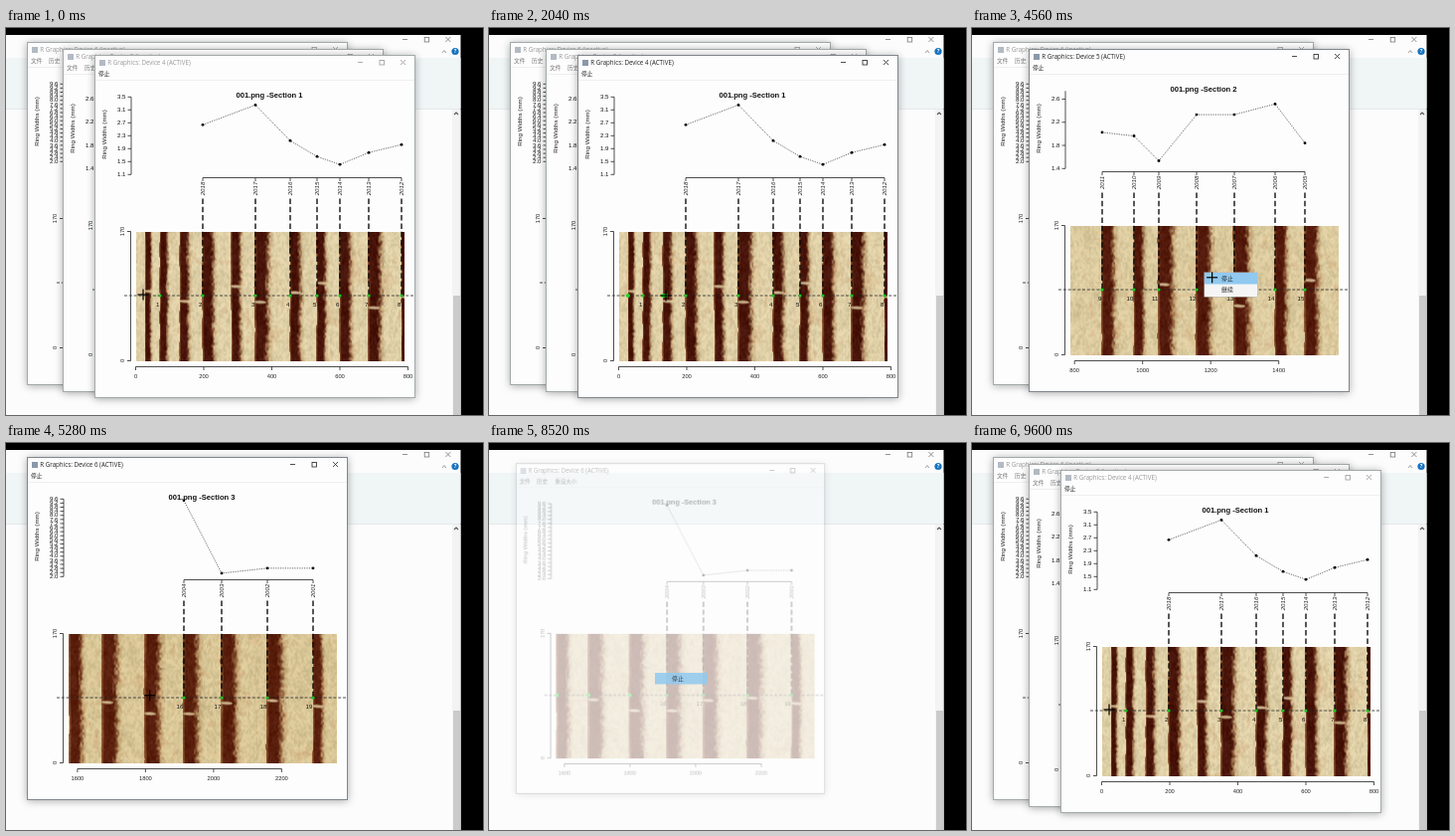
Animation, 480 px wide and 389 px high, one loop 9720 ms. Source, as an HTML page with a canvas:

```html
<!DOCTYPE html>
<html>
<head>
<meta charset="utf-8">
<style>
html, body { margin: 0; width: 480px; height: 389px; overflow: hidden; background: #000; }
canvas { display: block; }
</style>
</head>
<body>
<canvas id="stage" width="480" height="389"></canvas>
<script>
const W = 480, H = 389, LOOP = 9720, STEP = 120, CLOSE_MS = 300;
const PLOT = '"Liberation Sans", Arial, sans-serif';
const UI = '"Open Sans", "Noto Sans CJK SC", "Noto Sans CJK", sans-serif';
const WIN_W = 323, WIN_H = 345;
const SCAN = { x: 42, y: 177.5, w: 270, h: 130, mid: 242 };
const PX_PER_MM = 16.3;
const stage = document.getElementById('stage').getContext('2d');
const layer = newCanvas(W, H);
let c = stage;

function newCanvas(w, h) {
  const el = document.createElement('canvas');
  el.width = w;
  el.height = h;
  return el.getContext('2d');
}

// ---------- drawing helpers ----------
function rect(x, y, w, h, color) {
  c.fillStyle = color;
  c.fillRect(x, y, w, h);
}

function line(points, color = '#222', width = 0.8, dash = []) {
  c.beginPath();
  points.forEach(([x, y]) => c.lineTo(x, y));
  c.setLineDash(dash);
  c.strokeStyle = color;
  c.lineWidth = width;
  c.stroke();
  c.setLineDash([]);
}

function dot(x, y, r, color) {
  c.fillStyle = color;
  c.beginPath();
  c.arc(x, y, r, 0, 7);
  c.fill();
}

function text(str, x, y, font, color = '#222', align = 'center', turn = 0) {
  c.save();
  c.translate(x, y);
  c.rotate(turn);
  c.font = font;
  c.fillStyle = color;
  c.textAlign = align;
  c.textBaseline = 'middle';
  c.fillText(str, 0, 0);
  c.restore();
}

const upText = (str, x, y, font) => text(str, x, y, font + PLOT, '#222', 'center', -Math.PI / 2);

function caption(x, y, gap, color) {
  line([[x - 2.5, y], [x + 2.5, y]], color);
  c.strokeRect(x + gap - 2, y - 2, 4.5, 4.5);
  const k = x + 2 * gap;
  line([[k - 2.5, y - 2.5], [k + 2.5, y + 2.5]], color);
  line([[k - 2.5, y + 2.5], [k + 2.5, y - 2.5]], color);
}

// ---------- wood texture ----------
function hash(x, y) {
  const s = Math.sin(x * 127.1 + y * 311.7) * 43758.5453;
  return s - Math.floor(s);
}

function noise(x, y) {
  const i = Math.floor(x), j = Math.floor(y), u = x - i, v = y - j;
  const top = hash(i, j) * (1 - u) + hash(i + 1, j) * u;
  const low = hash(i, j + 1) * (1 - u) + hash(i + 1, j + 1) * u;
  return top * (1 - v) + low * v;
}

const clamp = (v, lo, hi) => Math.max(lo, Math.min(hi, v));
const mix = (a, b, k) => a.map((v, i) => v + (b[i] - v) * k);

// Each ring border starts a dark band whose width follows the gap to the next one.
function wood(borders, seed, light, dark) {
  const g = newCanvas(SCAN.w, SCAN.h), img = g.createImageData(SCAN.w, SCAN.h);
  const rust = [146, 78, 28];
  const bands = borders.map((x, i) => {
    const next = borders[i + 1] ?? SCAN.w;
    return [x, clamp((next - x) * 0.38, 4, 15)];
  });
  for (let y = 0; y < SCAN.h; y++) for (let x = 0; x < SCAN.w; x++) {
    let deep = 0, warm = 0;
    for (const [bx, bw] of bands) {
      const u = (x - bx + 0.7 - noise(bx, y / 14) * 1.2) / bw;
      if (u < -0.1) continue;
      const edge = 0.68 + (noise(x / 2 + seed, y / 2.5) - 0.5) * 0.3;
      deep = Math.max(deep, clamp(u < edge ? u * 4 + 0.6 : 1 - (u - edge) * 2.6, 0, 1));
      warm = Math.max(warm, 0.85 - Math.max(0, u - edge) * 1.3);
    }
    const patch = noise(x / 7 + seed, y / 10), grain = noise(x / 1.6 + seed, y / 2.2);
    const stain = Math.max(0, patch - 0.62) + Math.max(0, grain - 0.8);
    const base = mix(light, rust, clamp(warm * 0.75 + stain * 0.6, 0, 1));
    const n = ((patch - 0.5) * 20 + (grain - 0.5) * 30) * (1 - deep * 0.4);
    const rgb = mix(base, dark, deep * 0.95).map(v => v + n);
    img.data.set([...rgb, 255], (y * SCAN.w + x) * 4);
  }
  g.putImageData(img, 0, 0);
  g.fillStyle = 'rgba(230,212,168,.8)';
  for (const [x] of bands) {
    if (hash(x, 3) < 0.45) continue;
    g.beginPath();
    g.ellipse(x + 5, 50 + hash(x, seed) * 34, 6, 1.5, 0.05, 0, 7);
    g.fill();
  }
  return g.canvas;
}

// ---------- the three plot windows ----------
// rings: border positions, the first one only opens the first ring
// clicks: [time, x]; menu: [time, x, y]
const devices = [
  {
    section: 3, x: 21, y: 14, from: 4800, close: 8280, low: 2, top: 9.6,
    rings: [4, 158, 196, 242, 288],
    clicks: [[5880, 43], [6480, 76], [6990, 119]], menu: [7800, 167, 231],
    light: [217, 199, 152], dark: [84, 25, 8]
  },
  {
    section: 2, x: 57, y: 21, from: 3600, close: 4640, low: 1.4, top: 2.74,
    rings: [41, 74, 106, 131, 169, 207, 248, 278],
    clicks: [], menu: [4300, 234, 246],
    light: [220, 204, 160], dark: [78, 20, 7]
  },
  {
    section: 1, x: 89, y: 27, from: 480, close: 3645, low: 1.1, top: 3.5,
    rings: [66, 109, 162, 197, 224, 247, 276, 309],
    clicks: [[480, 51], [1440, 86], [2040, 89], [2760, 138]], menu: [3120, 233, 252],
    light: [224, 209, 168], dark: [66, 13, 4]
  }
];

for (const d of devices) {
  d.year = 2025 - 7 * d.section;
  d.years = d.rings.slice(1);
  d.widths = d.years.map((x, i) => (x - d.rings[i]) / PX_PER_MM);
  d.marks = d.rings.filter(x => x > SCAN.x);
  d.chosen = d.close - 40;
  const borders = [...d.marks, ...d.clicks.map(k => k[1])].sort((a, b) => a - b);
  const apart = borders.filter((x, i) => !i || x - borders[i - 1] > 5);
  d.image = wood(apart.map(x => x - SCAN.x), d.section * 13, d.light, d.dark);
}

function frame(d, t) {
  const active = t >= d.from, ink = active ? '#222' : '#999';
  const busy = (active || d.section === 1) && t < d.close;
  const state = active || d.section === 1 ? 'ACTIVE' : 'inactive';
  c.save();
  c.shadowColor = 'rgba(0,0,0,.32)';
  c.shadowBlur = 8;
  c.shadowOffsetY = 1;
  rect(0, 0, WIN_W, WIN_H, '#fdfdfd');
  c.restore();
  c.lineWidth = 1;
  c.strokeStyle = active ? '#80868c' : '#a3a9a9';
  c.strokeRect(0.5, 0.5, WIN_W - 1, WIN_H - 1);
  rect(5, 5, 6, 6, active ? '#8b98aa' : '#b3bac4');
  text(`R Graphics: Device ${d.section === 2 ? 5 : 3 + d.section + (d.section === 1 ? 0 : 0)} (${state})`,
    13.3, 8, '6.2px ' + UI, ink, 'left');
  caption(267.5, 7.5, 21.5, ink);
  const items = busy ? [['停止', 4]] : [['文件', 4], ['历史', 22], ['重设大小', 41]];
  for (const [name, x] of items) text(name, x, 20, '5.7px ' + UI, active || busy ? '#222' : '#777', 'left');
  line([[1, 25.5], [WIN_W - 1, 25.5]], '#ececec');
}

function widthPlot(d) {
  const base = 120.3, axisX = 37, yearY = 123.5;
  const yOf = v => base - (v - d.low) * 78 / (d.top - d.low);
  const points = d.years.map((x, i) => [x, yOf(d.widths[i])]);
  text(`001.png -Section ${d.section}`, 176, 40.5, 'bold 7.6px ' + PLOT, '#111');
  upText('Ring Widths (mm)', 10.5, 80, '6.2px ');
  line([[axisX, yOf(d.top)], [axisX, base]]);
  for (let v = d.low; v < d.top + 0.1; v += 0.4) {
    line([[axisX - 3.5, yOf(v)], [axisX, yOf(v)]]);
    text(v.toFixed(1), axisX - 5.5, yOf(v), '6.1px ' + PLOT, '#111', 'right');
  }
  line(points, '#444', 0.8, [1.2, 1.2]);
  line([[d.years[0], yearY], [d.years.at(-1), yearY]]);
  points.forEach(([x, y], i) => {
    dot(x, y, 1.4, '#000');
    line([[x, yearY], [x, yearY + 3.5]]);
    upText(d.year - i, x, 134.5, 'italic 6.1px ');
  });
}

function scanPlot(d, t) {
  const { x: left, y: top, w, h, mid } = SCAN;
  c.drawImage(d.image, left, top, w, h);
  line([[36.5, top], [36.5, top + h]]);
  for (const [name, y] of [['170', top], ['0', top + h]]) {
    line([[33, y], [36.5, y]]);
    upText(name, 28, y, '5.8px ');
  }
  const start = 36.8 + 4.7 * d.section, gap = 68.5;
  let value = 800 * (d.section - 1), x = start;
  for (; x < 318; x += gap, value += 200) {
    line([[x, 313.5], [x, 317]]);
    text(value, x, 323.3, '5.8px ' + PLOT);
  }
  line([[start, 313.5], [x - gap, 313.5]]);
  line([[30, mid], [WIN_W - 1, mid]], '#222', 0.8, [3, 1.8]);
  for (const x of d.years) line([[x, 144.5], [x, mid]], '#000', 1.3, [5.5, 2.8]);
  const lastLabel = 8 + [0, 7, 11][d.section - 1];
  d.marks.forEach((x, i) => {
    dot(x, mid, 1.6, '#18c81c');
    text(lastLabel - d.marks.length + 1 + i, x - 0.5, mid + 9, '6.2px ' + PLOT, '#111', 'right');
  });
  for (const [at, x] of d.clicks) if (t >= at) dot(x, mid, 2, '#10e020');
}

function drawDevice(d, t) {
  const p = Math.max(0, (t - d.close) / CLOSE_MS);
  if (p >= 1) return;
  c = p ? layer : stage;
  if (p) c.clearRect(0, 0, W, H);
  c.save();
  c.translate(d.x, d.y);
  frame(d, t);
  widthPlot(d);
  scanPlot(d, t);
  c.restore();
  c = stage;
  if (!p) return;
  const s = 1 - 0.045 * p, cx = d.x + WIN_W / 2, cy = d.y + WIN_H / 2;
  c.save();
  c.globalAlpha = 1 - p ** 1.5;
  c.translate(cx, cy);
  c.scale(s, s);
  c.drawImage(layer.canvas, -cx, -cy);
  c.restore();
}

// ---------- desktop, context menu, cursor ----------
function desktop() {
  rect(0, 0, W, H, '#000');
  rect(0, 7, 457.5, 382, '#fcfcfc');
  rect(0, 30, 457.5, 51, '#f0f5f6');
  line([[0, 81.5], [457, 81.5]], '#e0e6e8');
  caption(401.5, 11.5, 21.7, '#777');
  line([[439, 25], [441, 22.5], [443, 25]], '#888');
  dot(452, 23.5, 3.6, '#1673c0');
  text('?', 452, 23.7, 'bold 5.5px ' + UI, '#fff');
  rect(449, 82, 8.5, 307, '#f3f3f3');
  line([[451, 87], [453, 85], [455, 87]], '#555', 1.1);
  rect(450, 269, 7, 120, '#cbcbcb');
}

function contextMenu({ menu: [open, x, y], chosen, close }, t) {
  if (t < open || t >= close + CLOSE_MS) return;
  const font = '5.9px ' + UI;
  if (t < chosen) {
    rect(x - 0.5, y - 0.5, 54, 25, '#bbb');
    rect(x, y, 53, 24, '#f5f5f5');
    text('继续', x + 17, y + 17.5, font, '#222', 'left');
  }
  c.globalAlpha = t < chosen ? 1 : 0.85;
  rect(x, y, 53, 11.5, '#91c9f0');
  text('停止', x + 17, y + 6, font, '#222', 'left');
  c.globalAlpha = 1;
}

// The cursor visits every click, then each menu and its first entry.
const path = [[0, 138, 268]];
for (const d of [...devices].reverse()) {
  const [open, x, y] = d.menu;
  for (const [at, cx] of d.clicks) path.push([at, d.x + cx, d.y + SCAN.mid]);
  path.push([open, x, y], [d.chosen, x + 8, y + 5]);
}

function cursor(t) {
  const i = path.findIndex(k => k[0] > t);
  if (i < 0) return;
  const [a, ax, ay] = path[i - 1], [b, bx, by] = path[i];
  const u = (t - a) / (b - a), k = u * u * (3 - 2 * u);
  const x = ax + (bx - ax) * k, y = ay + (by - ay) * k;
  line([[x - 5.5, y], [x + 5.5, y]], '#000', 1.2);
  line([[x, y - 5.5], [x, y + 5.5]], '#000', 1.2);
}

let shown = -1;
function tick(now) {
  let t = Math.floor((now % LOOP) / STEP) * STEP;
  if (t >= 9600) t = 0;
  if (t !== shown) {
    shown = t;
    desktop();
    devices.forEach(d => drawDevice(d, t));
    devices.forEach(d => contextMenu(d, t));
    cursor(t);
  }
  requestAnimationFrame(tick);
}
tick(performance.now());
</script>
</body>
</html>
```
